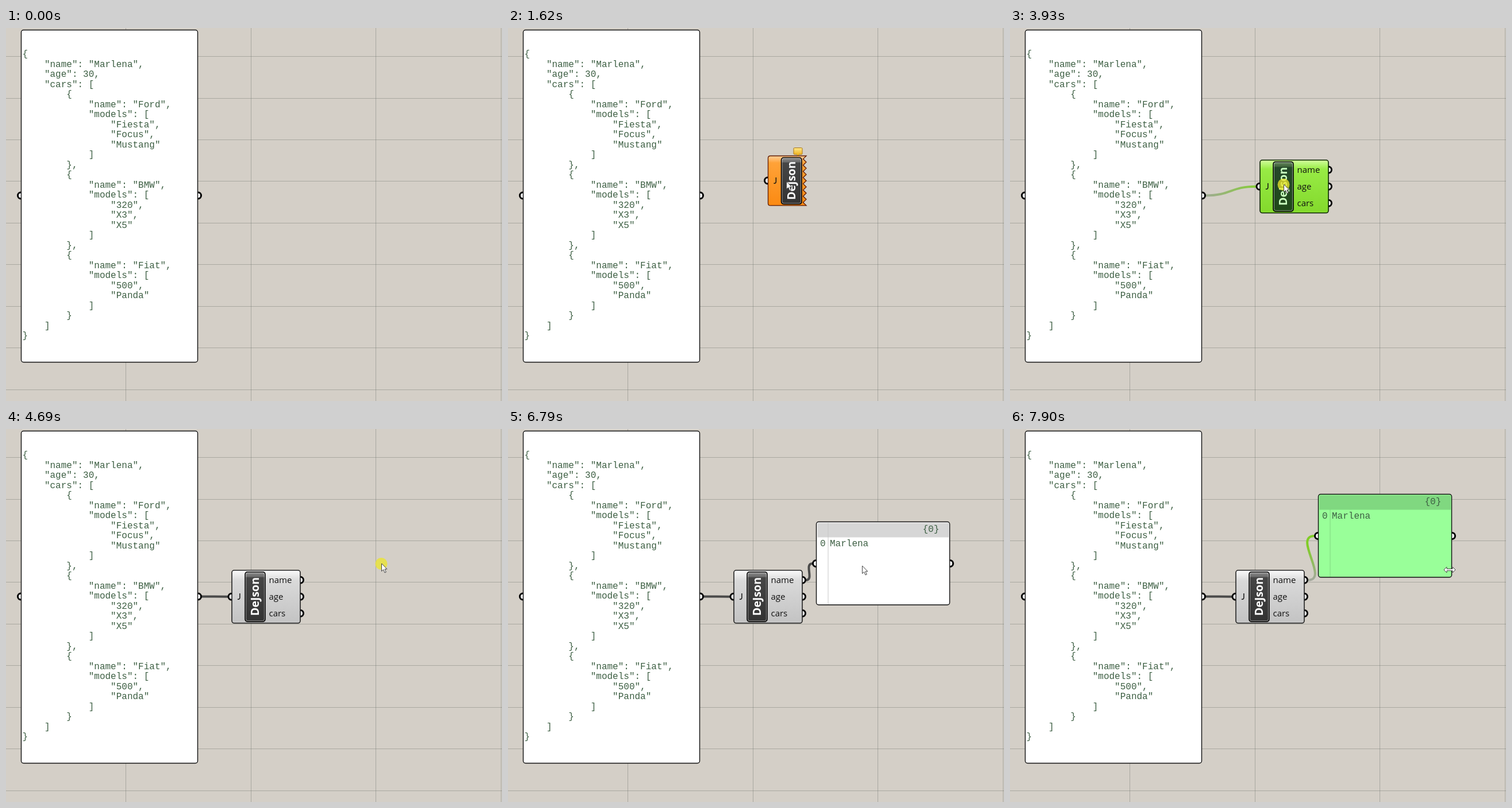
Animation, 863 px wide and 649 px high, one loop 8000 ms. Source, as an HTML page:

```html
<!DOCTYPE html>
<html lang="en">
<head>
<meta charset="utf-8">
<title>JSON node graph</title>
<style>
html, body { margin: 0; width: 100%; height: 100%; overflow: hidden; background: #d4cfc7; }
svg { display: block; width: 863px; height: 649px; }
text { font: 15px "Open Sans", "Noto Sans", sans-serif; fill: #111; }
.mono text { font: 16px "Liberation Mono", monospace; fill: #3d5f43; }
.title { font-size: 19.5px; font-weight: 700; fill: #fff; text-anchor: middle; }
.input { font-family: Lato, sans-serif; }
.port { r: 5.5px; fill: #fff; stroke: #000; stroke-width: 3; }
.frame { stroke: #111; stroke-width: 1.4; fill: #fff; }
.cap { fill: url(#dark); stroke: #000; stroke-width: 1.5; }
.gloss { fill: none; stroke: #fff; stroke-opacity: .45; }
.wire { fill: none; stroke: #4b4b4a; stroke-width: 4; }
.body { fill: url(#gray); stroke: #222; stroke-width: 1.6; }
.header { fill: #d6d6d6; }
.rule { stroke: #c8c8c8; }
.sel .body { fill: url(#green); stroke: #0b2600; }
.sel .cap { fill: url(#darkGreen); }
.sel .title { fill: #c9ffc0; }
.sel .frame { fill: #99ff99; }
.sel .header { fill: #80d880; }
.sel .rule { stroke: #80d880; }
#wireIn.sel { stroke: url(#fadeX); }
#wireOut.sel { stroke: url(#fadeY); }
#temp { stroke: #000; stroke-width: 5; stroke-dasharray: 9 4; }
.row { fill: #ececec; stroke: #777; }
.pointer { fill: #fff; stroke: #444; }
#link { fill: #ccc; stroke: #333; }
</style>
</head>
<body>
<svg viewBox="0 0 863 649" xmlns="http://www.w3.org/2000/svg">
  <defs>
    <linearGradient id="gray" x2="0" y2="1">
      <stop stop-color="#fafafa"/><stop offset=".2" stop-color="#d9d9d9"/><stop offset="1" stop-color="#c3c3c3"/>
    </linearGradient>
    <linearGradient id="green" x2="0" y2="1">
      <stop stop-color="#d2ff9e"/><stop offset=".17" stop-color="#98eb45"/><stop offset="1" stop-color="#83d92c"/>
    </linearGradient>
    <linearGradient id="orange" x2="0" y2="1">
      <stop stop-color="#ffd09a"/><stop offset=".14" stop-color="#ffa238"/><stop offset="1" stop-color="#fb8a12"/>
    </linearGradient>
    <linearGradient id="dark" x2="0" y2="1">
      <stop stop-color="#909090"/><stop offset=".1" stop-color="#686868"/><stop offset=".11" stop-color="#464646"/><stop offset="1" stop-color="#333"/>
    </linearGradient>
    <linearGradient id="darkGreen" x2="0" y2="1">
      <stop stop-color="#6a8a64"/><stop offset=".1" stop-color="#3e6238"/><stop offset=".11" stop-color="#25482a"/><stop offset="1" stop-color="#1f4a18"/>
    </linearGradient>
    <linearGradient id="gold" x2="0" y2="1">
      <stop stop-color="#ffe88a"/><stop offset="1" stop-color="#eda90c"/>
    </linearGradient>
    <linearGradient id="fadeX" gradientUnits="userSpaceOnUse" x1="340" x2="425" y1="0" y2="0">
      <stop stop-color="#a0ab94"/><stop offset="1" stop-color="#86cb3a"/>
    </linearGradient>
    <linearGradient id="fadeY" gradientUnits="userSpaceOnUse" x1="0" x2="0" y1="263" y2="205">
      <stop stop-color="#a3a89c"/><stop offset="1" stop-color="#80cc26"/>
    </linearGradient>
    <marker id="tip" markerUnits="userSpaceOnUse" markerWidth="18" markerHeight="14" refX="13" refY="7">
      <path d="M0 1L17 7L0 13Z"/>
    </marker>
  </defs>

  <path id="grid" fill="none" stroke="#5f655f" stroke-opacity=".36"/>
  <path id="wireIn" class="wire"/>
  <path id="wireOut" class="wire"/>

  <g id="source" class="mono">
    <circle class="port" cx="26" cy="291.5"/><circle class="port" cx="334" cy="291.5"/>
    <rect class="frame" x="26.5" y="3.5" width="307" height="578" rx="4"/>
  </g>

  <g id="raw">
    <circle class="port" cx="452" cy="265.5"/>
    <path id="torn" fill="url(#orange)" stroke="#5e1a00" stroke-width="1.3"/>
    <text class="input" x="462" y="270.5">J</text>
    <rect class="cap" x="475.5" y="225.5" width="35.5" height="81" rx="4"/>
    <rect class="gloss" x="477" y="227" width="32.5" height="78" rx="3"/>
    <text class="title" transform="translate(499.5 265.5) rotate(-90)">DeJson</text>
    <path d="M498.5 208.5h12q1.5 0 1.5 1.5v8.5q0 1.5-1.5 1.5h-4l-2 2.5l-2-2.5h-4q-1.5 0-1.5-1.5v-8.5q0-1.5 1.5-1.5z" fill="url(#gold)" stroke="#a87412"/>
  </g>

  <g id="node">
    <circle class="port" cy="46.2"/>
    <g id="outs"></g>
    <rect class="body" x=".5" y=".3" width="119" height="92" rx="4"/>
    <text class="input" x="10" y="51.5">J</text>
    <rect class="cap" x="23.5" y="3.2" width="35" height="86.5" rx="4"/>
    <rect class="gloss" x="25" y="4.7" width="32" height="83.5" rx="3"/>
    <text class="title" transform="translate(47.5 46) rotate(-90)">DeJson</text>
  </g>

  <g id="panel" class="mono">
    <circle class="port" cx="536" cy="234"/><circle class="port" cx="769" cy="234"/>
    <rect class="frame" x="536.5" y="161.5" width="232" height="144.5" rx="4"/>
    <g id="hint">
      <text x="541" y="180">Double click to edit</text>
      <text x="541" y="197.5">panel content…</text>
    </g>
    <g id="content">
      <rect class="header" x="538.5" y="163.5" width="228.5" height="25"/>
      <path class="rule" d="M557 163.5V305"/>
      <text x="721.5" y="178.5">{0}</text>
      <text x="543" y="204">0</text>
      <text id="value" x="560" y="204"></text>
    </g>
  </g>

  <g id="popup">
    <g id="rows"></g>
    <rect x="394.5" y="250.5" width="178" height="32" rx="4" fill="#dcdcdc" stroke="#444"/>
    <rect x="399.5" y="255.5" width="168" height="22" fill="#fff" stroke="#999"/>
    <text id="query" x="404" y="272"></text>
  </g>

  <path id="temp" class="wire" marker-end="url(#tip)"/>
  <g id="mouse">
    <circle id="press" r="10.5" cy=".5" fill="#ece52c" fill-opacity=".77"/>
    <path id="link" class="pointer" d="M7 11.5H13V8.500L19 13.500L13 18.500V15.500H7Z"/>
    <path id="arrow" class="pointer" d="M.5 0V13.5L3.7 10.6L6 16L8.3 15L6 9.8H10Z"/>
    <path id="resize" class="pointer" d="M-10 0L-5 -5V-1.5H5V-5L10 0L5 5V1.5H-5V5Z"/>
  </g>
</svg>

<script>
const $ = id => document.getElementById(id);
const LOOP = 8000;

const person = {
  name: "Marlena",
  age: 30,
  cars: [
    { name: "Ford", models: ["Fiesta", "Focus", "Mustang"] },
    { name: "BMW", models: ["320", "X3", "X5"] },
    { name: "Fiat", models: ["500", "Panda"] }
  ]
};
const matches = ["Deconstruct", "Degrees", "Delaunay Mesh", "DeJson", "Dispatch",
  "Division", "Depth", "Distance", "Domain", "Duplicate Data"];

// Bursts of screen updates: start, end, steps
const bursts = [[200, 400, 3], [630, 1170, 6], [1620, 1620, 1], [1940, 2720, 8],
  [2830, 3170, 4], [3390, 4150, 8], [4250, 4690, 5], [4920, 5140, 3],
  [5360, 5910, 6], [6130, 6910, 8], [7010, 7220, 3], [7460, 7900, 5]];

// Pointer path: time, x, y
const path = [[200, 562, 373], [400, 484, 267], [1830, 484, 267], [2720, 341, 293],
  [2830, 341, 292], [2943, 395, 272], [3170, 446, 265], [3390, 456, 264],
  [3607, 494, 262], [3933, 476, 272], [4150, 434, 288], [4690, 653, 234],
  [5250, 653, 234], [5690, 473, 265], [5910, 514, 264], [6130, 515, 263],
  [6353, 531, 237], [6799, 616, 238], [6910, 638, 249], [7010, 638, 249],
  [7220, 638, 201], [7350, 638, 201], [7900, 765, 245]];
const presses = [[2830, 3390], [3600, 4250], [4690, 4920], [6130, 6460], [7010, 7460]];

function add(parent, tag, attrs, text = "") {
  const el = document.createElementNS("http://www.w3.org/2000/svg", tag);
  for (const key in attrs) el.setAttribute(key, attrs[key]);
  el.textContent = text;
  return parent.appendChild(el);
}

function build() {
  let grid = "";
  for (let y = 49.6; y < 649; y += 72.45) grid += `M0 ${Math.floor(y) + .5}H863`;
  for (let x = 208.6; x < 863; x += 217.6) grid += `M${Math.floor(x) + .5} 0V649`;
  $("grid").setAttribute("d", grid);

  JSON.stringify(person, null, 4).split("\n").forEach((line, i) => {
    const text = line.trimStart();
    add($("source"), "text", { x: 28.5 + (line.length - text.length) * 9.6, y: 50.2 + i * 17.5 }, text);
  });

  const teeth = "l-5.5 5.4l5.5 5.4".repeat(8);
  $("torn").setAttribute("d", `M456.5 222.5H519${teeth}H456.5q-4 0-4-4V226.5q0-4 4-4z`);

  Object.keys(person).forEach((key, i) => {
    const y = 17.3 + i * 29;
    add($("outs"), "circle", { class: "port", cx: 119.5, cy: y });
    add($("node"), "text", { x: 65, y: y + 5 }, key);
  });
  $("value").textContent = person.name;
}

const within = (t, [a, b]) => t >= a && t < b;
const show = (id, on) => { $(id).style.display = on ? "" : "none"; };
const select = (id, on) => $(id).classList.toggle("sel", on);
const move = (id, x, y) => $(id).setAttribute("transform", `translate(${x} ${y})`);

function snap(t) {
  const burst = bursts.filter(b => b[0] <= t).pop();
  if (!burst) return 0;
  const [start, end, n] = burst;
  if (n < 2) return start;
  const step = (end - start) / (n - 1);
  return start + Math.min(n - 1, Math.floor((t - start + 15) / step)) * step;
}

function pointer(t) {
  const i = path.findIndex(p => p[0] > t);
  if (i < 0) return path[path.length - 1].slice(1);
  if (!i) return path[0].slice(1);
  const [t0, x0, y0] = path[i - 1], [t1, x1, y1] = path[i];
  const k = (t - t0) / (t1 - t0);
  return [x0 + (x1 - x0) * k, y0 + (y1 - y0) * k];
}

function wire(id, x0, y0, x1, y1) {
  const d = Math.hypot(x1 - x0, y1 - y0) / 2;
  $(id).setAttribute("d", `M${x0} ${y0}C${x0 + d} ${y0} ${x1 - d} ${y1} ${x1} ${y1}`);
}

function search(t) {
  const first = within(t, [630, 1620]), second = within(t, [4920, 5140]);
  show("popup", first || second);
  if (!first && !second) return;
  move("popup", second ? 169 : 0, second ? -32.5 : 0);
  const step = Math.round((t - (second ? 4920 : 630)) / 108);
  const typed = second ? '"'.repeat(step) : "dejson".slice(0, step > 4 ? 6 : step);
  const found = !typed ? [] : second ? ["Panel"]
    : typed.length < 3 ? matches : ["DeJson"];
  $("query").textContent = typed;
  $("rows").replaceChildren();
  found.forEach((name, i) => {
    const y = 225.5 - i * 25;
    add($("rows"), "rect", { class: "row", x: 394.5, y, width: 178, height: 24, rx: 3 });
    add($("rows"), "rect", { x: 400, y: y + 5, width: 14, height: 14, rx: 2, fill: "#777" });
    add($("rows"), "text", { x: 421, y: y + 17 }, name);
  });
}

function draw(t) {
  const [x, y] = pointer(t);
  const linked = t >= 3390, filled = t >= 6460;
  const linking = within(t, [2830, 3390]) || within(t, [6130, 6460]);
  search(t);

  show("raw", within(t, [1620, 3390]));
  show("node", linked);
  show("wireIn", linked);
  const [dragX, dragY] = t < 3600 ? [494, 262] : pointer(Math.min(t, 4150));
  const nodeX = 452.5 + dragX - 494, nodeY = 219.5 + dragY - 262;
  move("node", nodeX, nodeY);
  wire("wireIn", 340, 291.5, nodeX - 6, nodeY + 46.2);
  const picked = within(t, [3600, 4690]);
  select("node", picked);
  select("wireIn", picked);

  const lift = t < 7010 ? 0 : pointer(Math.min(t, 7220))[1] - 249;
  show("panel", t >= 5140);
  show("hint", !filled);
  show("content", filled);
  show("wireOut", filled);
  move("panel", 0, lift);
  wire("wireOut", 518, 263, 530, 234 + lift);
  select("panel", t >= 7010);
  select("wireOut", t >= 7010);

  show("temp", linking);
  if (t < 5000) wire("temp", 340, 291.5, x, y + 2);
  else wire("temp", 518, 263, x, y);

  const resizing = t >= 7890;
  show("mouse", t >= 200 && !within(t, [630, 1620]) && !within(t, [4920, 5140]));
  show("press", presses.some(p => within(t, p)));
  show("link", linking);
  show("arrow", !resizing);
  show("resize", resizing);
  move("mouse", x, y);
}

function tick() {
  draw(snap(performance.now() % LOOP));
  requestAnimationFrame(tick);
}

build();
tick();
</script>
</body>
</html>
```
